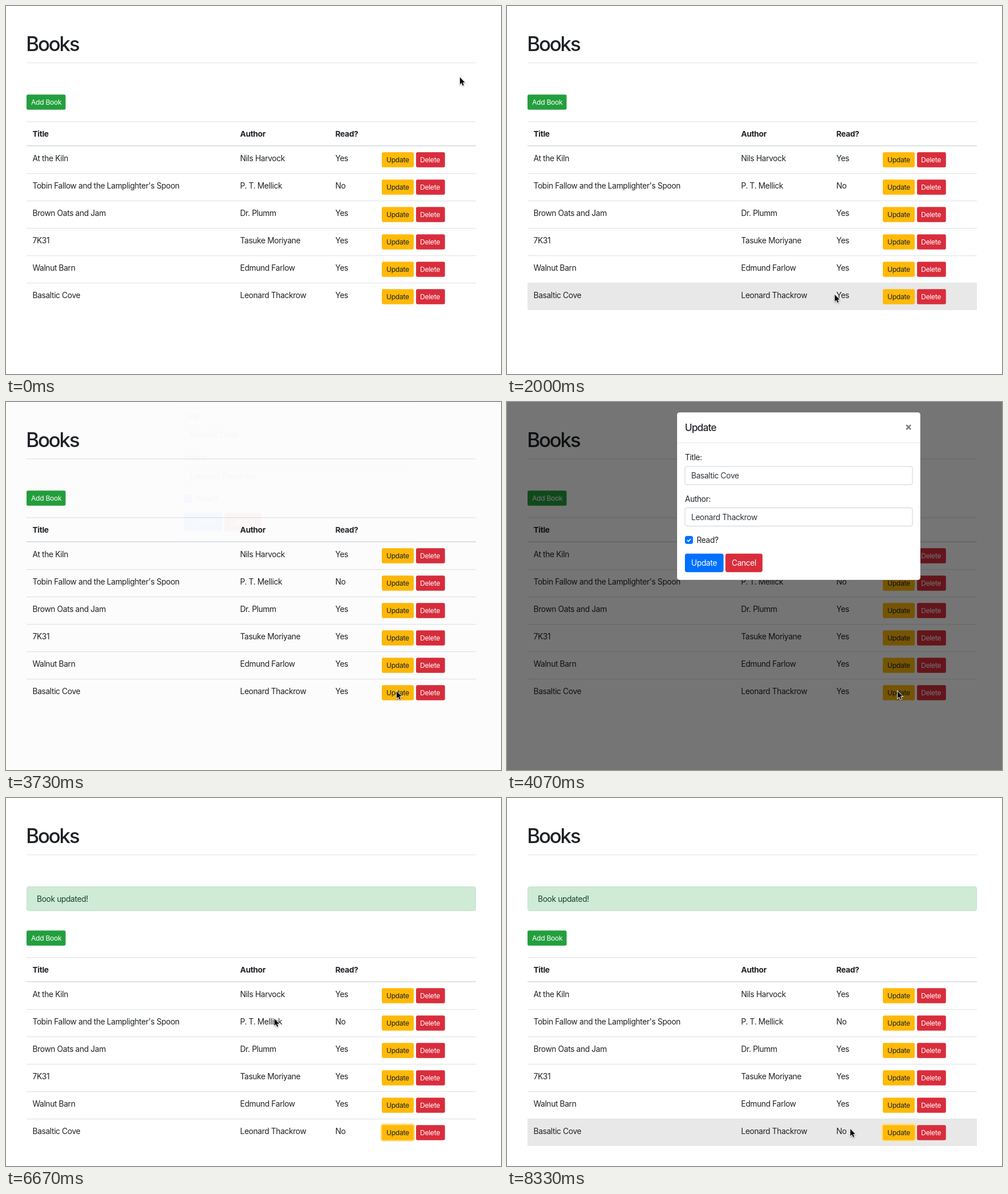
Recreate the animation shown at these times as an HTML page. Size 868 px wide and 645 px high, loop 8.67 s.

```html
<!DOCTYPE html>
<html lang="en">
<head>
<meta charset="utf-8">
<title>Books</title>
<style>
html, body { margin: 0; width: 100%; height: 100%; overflow: hidden; background: #fff; }
svg { display: block; width: 868px; height: 645px; }
text {
  font: 400 13.8px Inter, "Open Sans", sans-serif;
  font-optical-sizing: none;
  letter-spacing: -.027em;
  fill: #1e2226;
  white-space: pre;
}
text.h1 { font-size: 34.8px; font-weight: 500; letter-spacing: -.062em; }
text.h5 { font-size: 17.2px; font-weight: 500; letter-spacing: -.045em; }
text.th { font-weight: 700; }
text.sm { font-size: 12.2px; }
text.white { fill: #fff; }
text.field { fill: #30363c; }
text.alert { fill: #17422a; }
.pointer { filter: drop-shadow(0 1px 1.2px rgba(0, 0, 0, .35)); }
</style>
</head>
<body>
<svg id="stage" viewBox="0 0 868 645"></svg>
<script>
const LOOP = 8670, FRAME = 1000 / 15;
const ROW0 = 245, PITCH = 48, SHIFT = 77;
const GREEN = '#239f3d', YELLOW = '#ffb908', YELLOW_HOVER = '#e2a206',
      RED = '#d92d3c', BLUE = '#0070ff', BLUE_HOVER = '#055fd8', BLUE_PRESSED = '#b3d7ff';
const OPEN = 3730, PRESS = 5060, UNCHECK = 5190, BLUR = 6190,
      CLOSE = 6260, ALERT = 6330, HOVER_AGAIN = 7350;

const books = [
  ['At the Kiln', 'Nils Harvock', 'Yes'],
  ["Tobin Fallow and the Lamplighter's Spoon", 'P. T. Mellick', 'No'],
  ['Brown Oats and Jam', 'Dr. Plumm', 'Yes'],
  ['7K31', 'Tasuke Moriyane', 'Yes'],
  ['Walnut Barn', 'Edmund Farlow', 'Yes'],
  ['Basaltic Cove', 'Leonard Thackrow', 'Yes']
];

// Pointer path: time, x, y
const path = [
  [0, 796, 125], [270, 796, 125], [1130, 612, 412], [1200, 612, 412],
  [1330, 593, 440], [2130, 570, 513], [2450, 545, 490], [2870, 618, 508],
  [3000, 618, 508], [3065, 634, 511], [3650, 685, 507], [4070, 685, 507],
  [4270, 487, 254], [4400, 487, 254], [4930, 353, 239.5], [5470, 353, 239.5],
  [5870, 344, 289], [6330, 344, 289], [6665, 470, 386], [6800, 486, 477],
  [7000, 486, 477], [7930, 569, 598], [8330, 602, 580], [LOOP, 602, 580]
];

const stage = document.getElementById('stage');

function add(parent, tag, attrs) {
  const el = document.createElementNS('http://www.w3.org/2000/svg', tag);
  for (const k in attrs) el.setAttribute(k, attrs[k]);
  return parent.appendChild(el);
}
const group = (parent = stage) => add(parent, 'g', {});
const box = (parent, x, y, width, height, fill, rx = 0, more = {}) =>
  add(parent, 'rect', { x, y, width, height, fill, rx, ...more });
function label(parent, x, y, str, cls = '') {
  const el = add(parent, 'text', { x, y, class: cls });
  el.textContent = str;
  return el;
}
function button(parent, x, y, w, h, fill, str, tx, ty, cls) {
  const face = box(parent, x, y, w, h, fill, h > 30 ? 3.6 : 2.7);
  label(parent, tx, ty, str, cls);
  return face;
}
const show = (el, on) => el.setAttribute('visibility', on ? 'visible' : 'hidden');
const moveTo = (el, x, y) => el.setAttribute('transform', `translate(${x} ${y})`);

// Page
const page = group();
label(page, 35.2, 79, 'Books', 'h1');
box(page, 36, 99, 788, 1.2, '#e4e5e6');
const alertBox = group(page);
box(alertBox, 36.5, 155.5, 787, 42, '#cfebd6', 3.5, { stroke: '#bde3c8' });
label(alertBox, 54, 182, 'Book updated!', 'alert');

const table = group(page);
button(table, 36, 155.3, 68.5, 26.5, GREEN, 'Add Book', 44, 173.4, 'sm white');
const hoverRow = box(table, 36, 0, 788, PITCH, '#e8e8e8');
box(table, 36, 202.2, 788, 1.2, '#e1e4e7');
box(table, 36, 244, 788, 2, '#dfe2e5');
[[46.5, 'Title'], [410.5, 'Author'], [577.5, 'Read?']].forEach(([x, s]) => label(table, x, 229, s, 'th'));
const ring = box(table, 656.5, 493.5, 60.5, 31.5, '#ffdf8c', 5);

let lastUpdate, lastRead;
books.forEach(([title, author, read], i) => {
  const y = ROW0 + i * PITCH;
  if (i) box(table, 36, y, 788, 1.2, '#e1e4e7');
  label(table, 46.5, y + 27, title);
  label(table, 410.5, y + 27, author);
  lastRead = label(table, 577.5, y + 27, read);
  lastUpdate = button(table, 659, y + 11.2, 56, 26.5, YELLOW, 'Update', 667, y + 29.4, 'sm');
  button(table, 719, y + 11.2, 50.7, 26.5, RED, 'Delete', 726, y + 29.4, 'sm white');
});

const shade = box(stage, 0, 0, 868, 645, '#000');

// Dialog
const modal = group();
box(modal, 298, 18, 427, 294, '#fff', 4.5, { stroke: '#000', 'stroke-opacity': .2 });
label(modal, 312, 51, 'Update', 'h5');
add(modal, 'path', { d: 'M700.2 40.2l7.8 7.8m0-7.8l-7.8 7.8', stroke: '#7c7c7c', 'stroke-width': 2.5 });
box(modal, 298, 71, 427, 1, '#e6e9ec');
function field(y, name, value) {
  label(modal, 312, y - 11, name);
  box(modal, 312, y, 399, 32, '#fff', 3.6, { stroke: '#ccd2d8' });
  label(modal, 323, y + 21, value, 'field');
}
field(113, 'Title:', books[5][0]);
field(185.5, 'Author:', books[5][1]);
const checkRing = box(modal, 310.2, 232.9, 17.6, 17.6, '#fff', 5, { stroke: '#bfdeff', 'stroke-width': 1.8 });
const check = box(modal, 312, 234.7, 14, 14, BLUE, 3.5);
const tick = add(modal, 'path', {
  d: 'M315.8 242l2.3 2.3 4-4.3', fill: 'none', stroke: '#fff', 'stroke-width': 1.7
});
label(modal, 332.5, 247, 'Read?');
const save = button(modal, 312, 265.8, 67.7, 32.4, BLUE, 'Update', 323, 287, 'white');
button(modal, 383, 265.8, 65, 32.4, RED, 'Cancel', 394, 287, 'white');

// Pointers
const arrow = add(stage, 'path', {
  class: 'pointer',
  d: 'M0 0V12.4L2.8 9.8L4.9 14.4L6.9 13.5L4.9 9.1H8.7Z',
  fill: '#0a0a0a', stroke: '#fff', 'stroke-width': 1.7, 'paint-order': 'stroke'
});
const hand = add(stage, 'path', {
  class: 'pointer',
  d: 'M-1 1.2a1.1 1.1 0 0 1 2.2 0V5l1.6.2 1.9.4 1.7.6c.5.3.6.7.6 1.2 0 2.2-.8 3.2-1.2 4.4V13H.2L-.6 11.4-3.4 8.3c-.9-1.3.6-2.3 1.6-1.3L-1 7.8Z',
  fill: '#fff', stroke: '#111', 'stroke-width': .9
});

const clamp = v => Math.min(1, Math.max(0, v));
const ramp = (t, start, ms) => clamp((t - start) / ms);
const easeOut = p => 1 - (1 - p) ** 1.7;

// Speed at a point of the path: zero beside a pause, else the mean slope
function speed(i, axis) {
  const a = path[i - 1], b = path[i], c = path[i + 1];
  if (!a || !c) return 0;
  const still = (p, q) => p[1] === q[1] && p[2] === q[2];
  return still(a, b) || still(b, c) ? 0 : (c[axis] - a[axis]) / (c[0] - a[0]);
}
function pointer(t) {
  let i = 1;
  while (i < path.length - 1 && path[i][0] < t) i++;
  const a = path[i - 1], b = path[i], ms = b[0] - a[0];
  const p = clamp((t - a[0]) / ms), k = p * p * (3 - 2 * p);
  return [1, 2].map(n => a[n] + (b[n] - a[n]) * k +
    ms * p * (1 - p) * ((1 - p) * speed(i - 1, n) - p * speed(i, n)));
}
const inside = (x, y, l, t, r, b) => x >= l && x <= r && y >= t && y <= b;

function draw(t) {
  const shift = t >= ALERT ? SHIFT : 0;
  const [x, y] = pointer(t);
  const covered = t >= OPEN && t < CLOSE + 150;

  moveTo(table, 0, shift);
  show(alertBox, shift);
  show(ring, t >= CLOSE + 200);
  lastRead.textContent = t >= UNCHECK ? 'No' : 'Yes';

  // Row highlight trails the pointer by one step
  const row = Math.floor((pointer(Math.max(0, t - FRAME))[1] - shift - ROW0) / PITCH);
  const canHover = t < OPEN || t > HOVER_AGAIN;
  show(hoverRow, canHover && row >= 0 && row < books.length);
  hoverRow.setAttribute('y', ROW0 + row * PITCH);

  // Shade and dialog fade together while the dialog slides
  const fade = ramp(t, OPEN, 150) - ramp(t, CLOSE, 150);
  const slide = easeOut(ramp(t, OPEN, 300)) - easeOut(ramp(t, CLOSE, 300));
  shade.setAttribute('opacity', .54 * fade);
  modal.setAttribute('opacity', fade);
  moveTo(modal, 0, -73 * (1 - slide));
  show(modal, covered);

  const checked = t < UNCHECK;
  check.setAttribute('fill', !checked ? '#d9dce2' : t < PRESS ? BLUE : BLUE_PRESSED);
  tick.setAttribute('opacity', checked ? 1 : 0);
  checkRing.setAttribute('opacity', !checked && t < BLUR ? 1 : 0);

  const overSave = covered && inside(x, y, 312, 266, 380, 298);
  const overUpdate = !covered && inside(x, y - shift, 659, 496, 715, 523);
  save.setAttribute('fill', overSave ? BLUE_HOVER : BLUE);
  lastUpdate.setAttribute('fill', overUpdate ? YELLOW_HOVER : YELLOW);

  moveTo(arrow, x, y);
  moveTo(hand, x, y);
  show(hand, overSave || overUpdate);
  show(arrow, !(overSave || overUpdate));
}

const start = performance.now();
function play() {
  const ms = (performance.now() - start) % LOOP;
  draw(Math.floor((ms + 4) / FRAME) * FRAME);
  requestAnimationFrame(play);
}
play();
</script>
</body>
</html>
```
